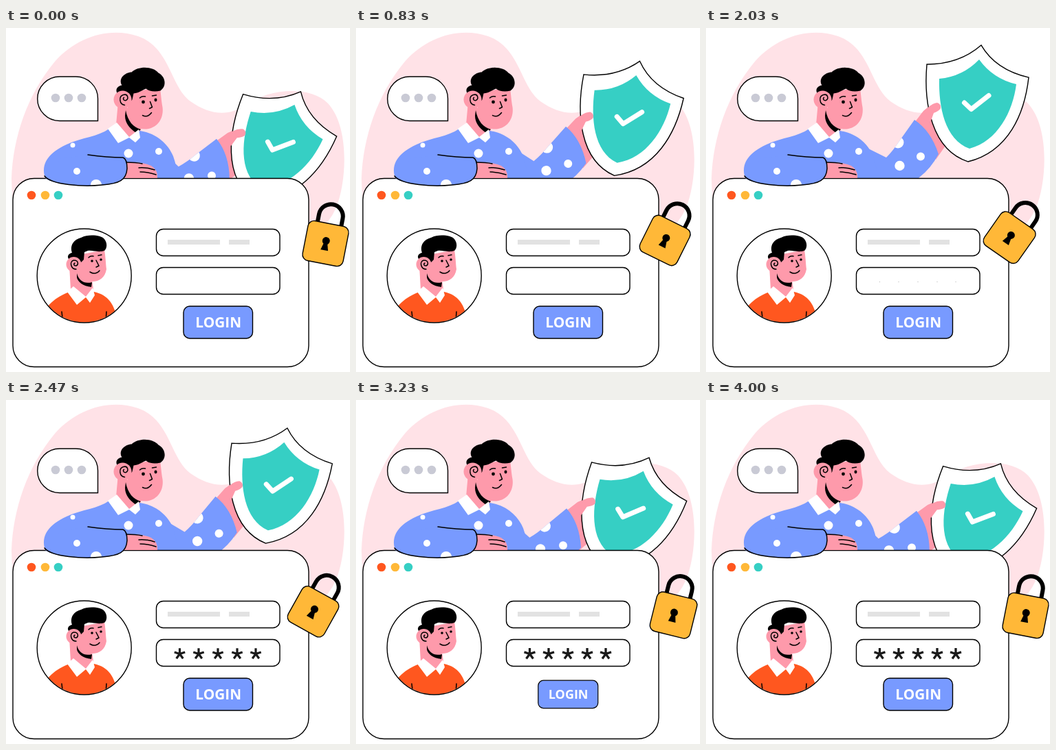
An HTML page that plays this animation: 500x502 px, repeating every 4030 ms.

```html
<!DOCTYPE html>
<html lang="en">
<head>
<meta charset="utf-8">
<title>Secure login</title>
<style>
  html, body { margin: 0; width: 100%; height: 100%; overflow: hidden; background: #fff; }
  svg { display: block; width: 500px; height: 502px; }
  .line { stroke: #000; stroke-width: 1.4; }
  .open { fill: none; stroke: #000; stroke-width: 1.5; stroke-linecap: round; stroke-linejoin: round; }
  .skin { fill: #fe9aab; }
  .blue { fill: #789aff; }
  .teal { fill: #36cfc4; }
  .orange { fill: #ff571f; }
  .yellow { fill: #ffb838; }
  .white { fill: #fff; }
  .grey { fill: #e2e2e2; }
  text { font: bold 20.8px "Open Sans", Lato, sans-serif; fill: #fff; text-anchor: middle; }
</style>
</head>
<body>
<svg viewBox="0 0 500 502">
  <defs>
    <path id="sleeve" d="M234 175L262 189Q272 179 281 165L303 134Q327 150 338 184Q327 205 310 218L290 245L240 245L226 196Z"/>
    <clipPath id="sleeveClip"><use href="#sleeve"/></clipPath>
    <path id="cuff" d="M57 219C70 229 112 232 140 229C165 227 175 222 176 205Q176 192 170 189L119 185L80 190Z"/>
    <clipPath id="cuffClip"><use href="#cuff"/></clipPath>
    <clipPath id="avatarClip"><circle cx="113.700" cy="361.500" r="68"/></clipPath>
  </defs>

  <path fill="#ffe2e7" d="M8 220C10 160 31 97 71 49C103 13 150 -2 192 12C239 29 238 84 268 107C296 127 325 130 350 111C380 90 440 82 468 110C500 145 495 225 480 262Q470 285 450 300L20 300Q8 260 8 220Z"/>

  <!-- chat bubble -->
  <path class="white line" d="M78 71H101.500A32 32 0 0 1 133.500 103V135.500H78A32 32 0 0 1 78 71Z"/>
  <g fill="#c9cad5"><circle cx="72" cy="102" r="6.300"/><circle cx="91" cy="102" r="6.300"/><circle cx="110" cy="102" r="6.300"/></g>

  <!-- shield arm -->
  <g id="hand"><path class="skin" d="M300 142L316 121Q326 112 335 110Q340 110 341 116L340 135L348 172L334 192Z"/></g>
  <g id="shield">
    <path class="white line" d="M400 25Q368 53 321 53C316 110 328 178 381 195C440 180 463 125 469 72Q421 61 400 25Z"/>
    <path class="teal" d="M397 46Q373 71 339 74C338 115 347 163 383 176C424 165 446 122 451 82Q417 74 397 46Z"/>
    <path d="M375.500 109L385.500 118.500L411 98.500" fill="none" stroke="#fff" stroke-width="7" stroke-linecap="round" stroke-linejoin="round"/>
  </g>
  <g id="arm">
    <path class="skin" d="M312 130Q323 111 336 109Q342 111 341 117Q339 121 331 124L326 138Z"/>
    <use href="#sleeve" class="blue"/>
    <g class="white" clip-path="url(#sleeveClip)"><circle cx="279" cy="167" r="8.500"/><circle cx="281.500" cy="201" r="7.200"/><circle cx="312" cy="187.500" r="6"/></g>
  </g>

  <!-- body -->
  <path class="blue" d="M57 219C50 198 62 182 88 170C112 159 133 159 150 147L195 150C220 154 236 170 243 187Q249 203 249 222H60Z"/>
  <g class="white"><circle cx="97" cy="171" r="3.500"/><circle cx="103" cy="209" r="5"/><circle cx="178" cy="183" r="6.500"/><circle cx="222" cy="180" r="5"/></g>

  <!-- head -->
  <path class="skin" d="M163 108L160 141L180 160L196 149L198 130Z"/>
  <path d="M174 120C177 136 185 145 196 148L189 153C179 146 173 138 173 128Z"/>
  <g transform="translate(-2.500 .5)">
    <path class="skin" d="M180 94L226 86C228 96 228 104 230 115C232 130 224 145 207 147C193 148 183 140 179 125Z"/>
    <path d="M165 96C160 89 165 84 171 83C165 73 176 64 185 64C196 54 217 56 224 65C234 70 237 84 227 91C219 93 210 92 206 88C199 91 196 94 188 95L186 104L181 110Z"/>
    <circle class="skin" cx="172" cy="104" r="13"/>
    <path class="open" d="M175 112C167 111 166 99 173 97C180 95 181 103 177 105C173 106 172 102 174 101"/>
    <circle cx="202" cy="107.500" r="2.400"/><ellipse cx="220" cy="104.500" rx="2" ry="2.400"/>
    <path class="open" d="M197 101.500Q200 98.500 205 99.500M215 98.500L221 97.500M212 107L215 115L211 117M201 127Q208 131 214 123"/>
  </g>
  <path class="white" d="M148 147L161 138L179 159L193 148L195 160L188 167L179 160L163 168Z"/>

  <!-- window -->
  <rect class="white line" x="10" y="219.500" width="430" height="275" rx="31"/>
  <circle class="orange" cx="37" cy="244" r="6.300"/><circle class="yellow" cx="57" cy="244" r="6.300"/><circle class="teal" cx="76" cy="244" r="6.300"/>

  <!-- resting arm -->
  <path class="skin" d="M172 196Q198 195 211 201Q221 207 220 219H170Z"/>
  <path class="open" d="M175 196Q189 196 198 198M193 204Q204 203 216 207M195 210Q206 210 218 214"/>
  <use href="#cuff" class="blue"/>
  <g class="white" clip-path="url(#cuffClip)"><circle cx="131" cy="229" r="8"/><circle cx="103" cy="209" r="5"/></g>
  <path class="open" d="M56 216C66 229 112 232 140 229C165 227 175 222 176 205Q176 191 170 189Q147 189 119 185"/>

  <!-- avatar -->
  <circle class="white" cx="113.700" cy="361.500" r="68.500"/>
  <g clip-path="url(#avatarClip)">
    <path class="orange" d="M45 435C55 405 72 393 92 385H128C150 390 160 405 162 435Z"/>
    <path class="open" d="M81 414L83 432M146 414L145 428"/>
    <path class="skin" d="M92 348L94 381L116 393L127 381L124 362Z"/>
    <path d="M103 358C106 369 114 374 125 371L124 378C112 377 104 370 103 364Z"/>
    <path class="skin" d="M106 331L143 324C145 336 145 344 146 352C144 364 136 370 125 370C112 369 106 360 104 348Z"/>
    <path d="M93 339C87 334 91 329 96 328C92 315 101 308 109 306C121 300 138 303 142 307C148 313 147 322 143 325C134 328 125 324 119 325L114 327L113 338L107 344Z"/>
    <circle class="skin" cx="98.500" cy="345" r="11"/>
    <path class="open" d="M102 352C94 352 92 341 98 339C105 338 106 345 102 347C98 347 98 344 100 343"/>
    <circle cx="125" cy="340" r="1.800"/><circle cx="138" cy="338" r="1.800"/>
    <path class="open" d="M120 335Q123 332 127 333M134 332L139 331M131 339L135 347L131 349M122 356Q130 361 136 354"/>
    <path class="white" d="M89 385L98 377L116 392L126 379L129 390L122 401L116 393L103 404Z"/>
  </g>
  <circle class="line" cx="113.700" cy="361.500" r="68.500" fill="none"/>

  <!-- form -->
  <rect class="white line" x="218.500" y="293.500" width="179.500" height="39" rx="10"/>
  <rect class="white line" x="218.500" y="349.500" width="179.500" height="39" rx="10"/>
  <rect class="grey" x="235" y="309" width="76" height="7"/><rect class="grey" x="324" y="309" width="30" height="7"/>
  <g id="stars" stroke="#1a1a1a" stroke-width="3.300"></g>
  <g id="button">
    <rect class="blue line" x="258" y="406" width="100.500" height="47" rx="9"/>
    <text x="308.700" y="437.300">LOGIN</text>
  </g>

  <!-- padlock -->
  <g id="lock">
    <g transform="translate(464.500 314.500) rotate(11)">
      <path d="M-17.500 -26V-40.500A17.500 17.500 0 0 1 17.500 -40.500V-26" fill="none" stroke="#000" stroke-width="6"/>
      <rect class="yellow line" x="-30" y="-29.500" width="60" height="59" rx="9"/>
      <circle cy="-4" r="5.500"/><path d="M-2 -3H2L5.500 10H-5.500Z"/>
    </g>
  </g>
</svg>
<script>
  const LOOP = 4030, HALF = 2000;
  const el = id => document.getElementById(id);
  const set = (node, value) => node.setAttribute('transform', value);
  const clamp = x => Math.min(1, Math.max(0, x));

  // Cubic bezier timing (.333, 0, .25, 1), solved by bisection.
  function ease(x) {
    if (x <= 0 || x >= 1) return clamp(x);
    let lo = 0, hi = 1, s = .5;
    for (let i = 0; i < 24; i++) {
      s = (lo + hi) / 2;
      const bx = s * (1 - s) ** 2 + .75 * s * s * (1 - s) + s ** 3;
      if (bx < x) lo = s; else hi = s;
    }
    return s * s * (3 - 2 * s);
  }
  const span = (t, from, to) => ease((t - from) / (to - from));
  const smooth = x => (1 - Math.cos(Math.PI * clamp(x))) / 2;

  const stars = [252.5, 280, 308, 336, 363].map(x => {
    const star = document.createElementNS('http://www.w3.org/2000/svg', 'path');
    star.setAttribute('d', 'M0 0V-8.500M0 0L8 -2.600M0 0L5 7M0 0L-5 7M0 0L-8 -2.600');
    el('stars').append(star);
    return { star, x };
  });

  function draw(t) {
    const lift = span(t, 0, HALF) - span(t, HALF, 2 * HALF);
    const drop = 17 * (1 - lift);
    set(el('shield'), `rotate(${drop} 187 154)`);
    for (const id of ['hand', 'arm']) set(el(id), `rotate(${drop} 212 158)`);
    set(el('lock'), `rotate(${24 * lift} 473.500 255)`);

    const size = span(t, 1950, 2620);
    for (const { star, x } of stars) set(star, `translate(${x} 370.500) scale(${size})`);

    const press = smooth(1 - Math.abs(t - 3230) / 300);
    set(el('button'), `translate(308.300 429.500) scale(${1 - .135 * press}) translate(-308.300 -429.500)`);
  }

  const start = performance.now();
  function tick() {
    draw((performance.now() - start) % LOOP);
    requestAnimationFrame(tick);
  }
  tick();
</script>
</body>
</html>
```
